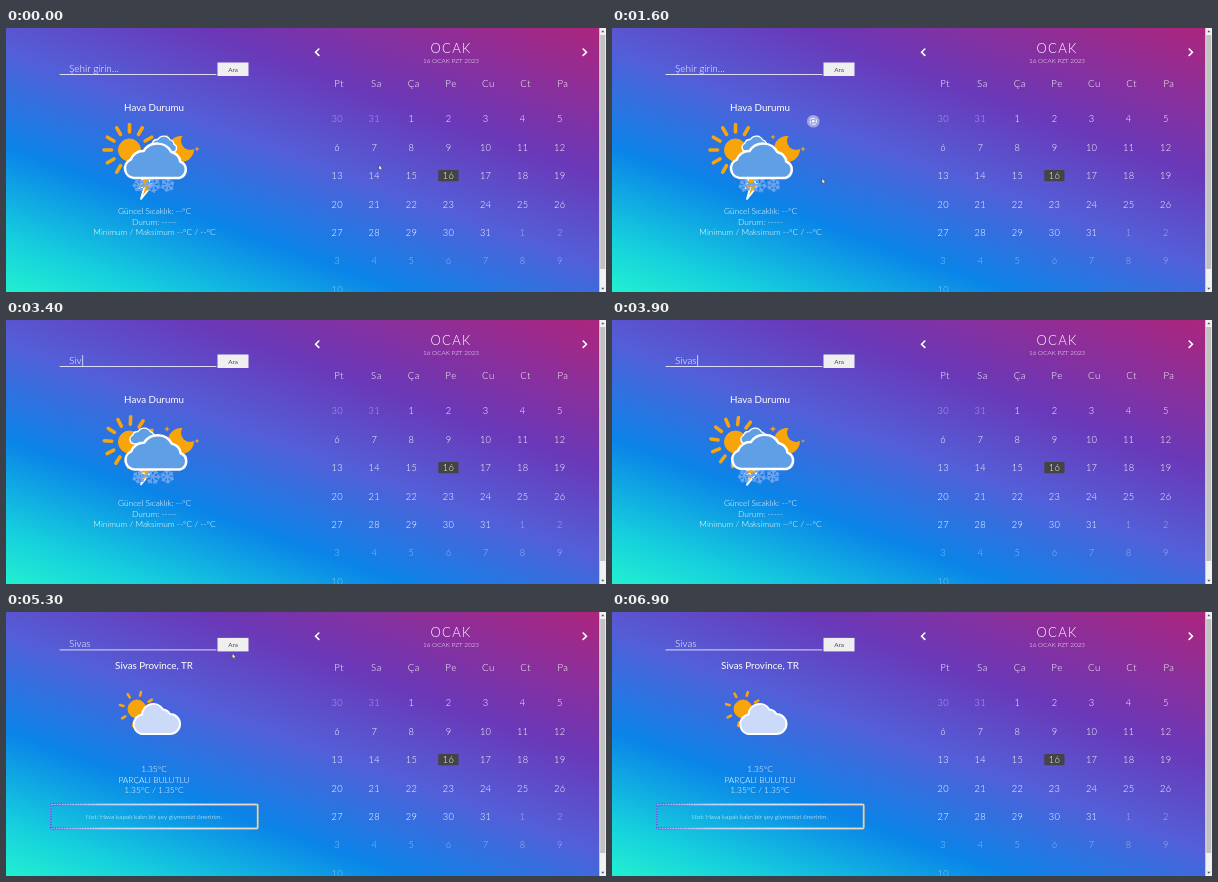
Recreate the animation shown at these times as an HTML page. Size 600 px wide and 264 px high, loop 7000 ms.

```html
<!DOCTYPE html>
<html lang="tr">
<head>
<meta charset="utf-8">
<title>Hava Durumu</title>
<style>
html, body { margin: 0; width: 100%; height: 100%; overflow: hidden; }
body { background: linear-gradient(20deg, #22f0d0, #16d0dd 11%, #0a84e8 30%, #535fd8 50%, #6a38b8 69%, #ad257c); }
svg { display: block; width: 600px; height: 264px; font-family: Lato, "Open Sans", sans-serif; font-weight: 300; fill: #fff; }
.mid text, text.mid { text-anchor: middle; }
.head { font-size: 9.8px; font-weight: 400; }
.info { font-size: 8.4px; }
.days { font-size: 9.3px; letter-spacing: .3px; }
.week { font-size: 9.6px; letter-spacing: .6px; }
.dim { opacity: .5; }
.line { fill: none; stroke: #fff; stroke-linecap: round; }
.orange { fill: #f8a50b; stroke: #f8a50b; stroke-linecap: round; }
</style>
</head>
<body>
<svg viewBox="0 0 600 264">
  <defs>
    <linearGradient id="edge" x2="1" y2="0">
      <stop stop-color="#4b5be6"/><stop offset=".25" stop-color="#a3b4f2"/>
      <stop offset=".65" stop-color="#cfcfe6"/><stop offset="1" stop-color="#e6c08c"/>
    </linearGradient>
    <mask id="crescent">
      <circle cx="175" cy="121" r="13" fill="#fff"/>
      <circle cx="184" cy="113" r="9" fill="#000"/>
    </mask>
    <path id="cloud" d="M10 36A10 10 0 0 1 7 17A13 13 0 0 1 20 8A16 16 0 0 1 48 9A12 12 0 0 1 57 19A9 9 0 0 1 56 36Z"/>
    <path id="star" d="M0-3L.8-.8L3 0L.8 .8L0 3L-.8 .8L-3 0L-.8-.8Z" fill="#f8a50b"/>
  </defs>

  <g id="calendar" class="mid">
    <text x="445" y="25" font-size="13" letter-spacing="1.3">OCAK</text>
    <text x="445" y="34.5" font-size="6.4">16 OCAK PZT 2023</text>
    <path class="line" stroke-width="1.6" d="M312.8 21l-3.2 3.2 3.2 3.2M577.2 21l3.2 3.2-3.2 3.2"/>
    <rect x="432.3" y="142" width="20.2" height="11.3" rx="1" fill="#444"/>
  </g>

  <g id="search">
    <text id="field" x="63" y="43.6" font-size="10"></text>
    <path id="caret" class="line" stroke-width=".7"/>
    <path class="line" stroke-width=".8" d="M54 46.5H210"/>
    <rect x="211.5" y="34.5" width="31" height="13.5" fill="#efefef"/>
    <text class="mid" x="227" y="43.5" font-size="6.3" font-weight="400" fill="#444">Ara</text>
  </g>

  <g id="before">
    <text class="mid head" x="148" y="83.2">Hava Durumu</text>
    <g class="orange">
      <g id="bigRays" stroke-width="3.6"></g>
      <circle cx="123.5" cy="122" r="11"/>
    </g>
    <rect x="160" y="105" width="32" height="32" fill="#f8a50b" mask="url(#crescent)"/>
    <use href="#star" id="starA"/>
    <use href="#star" id="starB"/>
    <path id="bolt" fill="#f8a50b" stroke="#fff" stroke-width="1.8" stroke-linejoin="round"/>
    <g id="snow" fill="none" stroke="#6aa4ee" stroke-width="1.7"></g>
    <g fill="#5f9fe6" stroke="#fff" stroke-linejoin="round">
      <use href="#cloud" id="backCloud" stroke-width="3"/>
      <use href="#cloud" id="frontCloud" stroke-width="2.6"/>
    </g>
    <g class="mid info">
      <text x="148.5" y="186.3">Güncel Sıcaklık: --°C</text>
      <text x="148.5" y="196.7">Durum: -----</text>
      <text x="148.5" y="207">Minimum / Maksimum --°C / --°C</text>
    </g>
    <g id="lens">
      <circle cx="201.3" cy="93.3" r="6.3" fill="#b9bfe6" opacity=".75"/>
      <rect x="198.3" y="90.3" width="6" height="6" rx="1.6" class="line" stroke-width=".9" stroke-dasharray="3 1.6"/>
      <circle cx="201.3" cy="93.3" r="1.2"/>
    </g>
  </g>

  <g id="after">
    <text class="mid head" x="148" y="57">Sivas Province, TR</text>
    <g class="orange">
      <g id="smallRays" stroke-width="2.6"></g>
      <circle cx="131" cy="97" r="9"/>
    </g>
    <path id="paleCloud" d="M9 33A10 10 0 0 1 10 13.5A11.3 11.3 0 0 1 31 8.5A10 10 0 0 1 38 13A10 10 0 0 1 38 33Z" fill="#cbdaf8" stroke="#fff" stroke-width="2"/>
    <g class="mid info">
      <text x="148" y="160">1.35°C</text>
      <text x="148" y="170.5">PARÇALI BULUTLU</text>
      <text x="148" y="180.7">1.35°C / 1.35°C</text>
    </g>
    <rect x="45" y="192.5" width="206.7" height="24" rx="1" fill="none" stroke="url(#edge)" stroke-width="1.8"/>
    <rect x="45" y="192.5" width="206.7" height="24" rx="1" class="line" stroke-width=".8" stroke-dasharray=".8 1.8" opacity=".7"/>
    <text class="mid" x="148" y="207" font-size="6.6">Not: Hava kapalı kalın bir şey giymenizi öneririm.</text>
  </g>

  <path id="cursor" d="M0 0V5L1.2 4L2 5.8L2.8 5.4L2 3.7H3.6Z" stroke="#222" stroke-width=".4"/>

  <g id="scrollbar">
    <rect x="593.3" width="7" height="264" fill="#f1f1f1"/>
    <rect x="594.2" y="7" width="5" height="234" fill="#c1c1c1"/>
    <path d="M595.2 4.3h3.2l-1.6-2ZM595.2 259.8h3.2l-1.6 2Z" fill="#555"/>
  </g>
</svg>
<script>
const LOOP = 7000, STEP = 100, SWAP = 5200;
const $ = id => document.getElementById(id);
const add = (id, markup) => $(id).insertAdjacentHTML('beforeend', markup);
const show = (id, on) => $(id).setAttribute('visibility', on ? 'visible' : 'hidden');
const place = (id, x, y, extra = '') => $(id).setAttribute('transform', `translate(${x} ${y}) ${extra}`);

// Linear interpolation through rows of [time, ...values]
function along(rows, t) {
  const i = rows.findIndex(r => r[0] > t);
  if (i < 0) return rows[rows.length - 1].slice(1);
  if (i === 0) return rows[0].slice(1);
  const a = rows[i - 1], b = rows[i], k = (t - a[0]) / (b[0] - a[0]);
  return a.slice(1).map((v, n) => v + (b[n + 1] - v) * k);
}

const week = ['Pt', 'Sa', 'Ça', 'Pe', 'Cu', 'Ct', 'Pa'];
add('calendar', week.map((d, i) =>
  `<text class="week" x="${333.2 + i * 37.3}" y="58.5">${d}</text>`).join(''));
for (let i = 0; i < 43; i++) {
  const n = i - 1, day = n < 1 ? n + 31 : n > 31 ? n - 31 : n;
  const x = 331.2 + (i % 7) * 37.1, y = 94.4 + Math.floor(i / 7) * 28.4;
  add('calendar', `<text class="days${n === day ? '' : ' dim'}" x="${x}" y="${y}">${day}</text>`);
}

const rays = (count, from, to) => Array.from({ length: count }, (_, i) =>
  `<path d="M${from} 0H${to}" transform="rotate(${i * 360 / count})"/>`).join('');
add('bigRays', rays(12, 18, 25.5));
add('smallRays', rays(8, 13.8, 17.5));

const flakes = [[133, 157.5, 6.5], [147, 157, 8], [161.5, 157, 7]];
add('snow', flakes.map(([, , r]) => {
  const arm = `M0 0H${r}M${r * .5} 0l${r * .3} ${r * .3}M${r * .5} 0l${r * .3} ${-r * .3}`;
  return '<g>' + [0, 60, 120, 180, 240, 300].map(a => `<path d="${arm}" transform="rotate(${a})"/>`).join('') + '</g>';
}).join(''));

const boltReach = [[0, 171], [800, 165], [1600, 171], [2400, 170], [3400, 164.5], [4500, 165.5], [5200, 171]];
const typed = [[0, ''], [3000, 'S'], [3200, 'Si'], [3300, 'Siv'], [3600, 'Siva'], [3800, 'Sivas']];
const pointer = [
  { from: 0, to: 2100, path: [[300, 373, 137], [700, 210, 150.5], [1800, 210, 150.5], [2100, 120, 44]] },
  { from: 4600, to: 6400, path: [[4600, 215, 50], [4900, 226, 41.5], [5500, 226.5, 41.5], [6200, 225, 57]] }
];

function drawBefore(t) {
  const wave = Math.sin(t / 3200 * 2 * Math.PI);
  const drift = Math.cos(t / 5600 * 2 * Math.PI);
  place('bigRays', 123.5, 122, `rotate(${wave * 7}) scale(${1 - wave * .03})`);
  place('frontCloud', 117.8 + wave * 1.3, 115.4 - Math.max(0, wave), 'scale(.99 .96)');
  place('backCloud', 132 + drift * 11, 108, 'scale(.44)');
  place('starA', 161, 109, `scale(${.9 + wave * .2})`);
  place('starB', 191, 121, `scale(${.9 - wave * .2})`);
  const [end] = along(boltReach, t);
  $('bolt').setAttribute('d', `M138 146L133 ${end - 11}H138L135 ${end}L147 ${end - 15}H142L147 146Z`);
  [...$('snow').children].forEach((f, i) => {
    const [x, y] = flakes[i];
    f.setAttribute('transform', `translate(${x - wave * .6} ${y - wave}) rotate(${t * .03 + i * 20})`);
  });
  show('lens', t >= 600 && t < 1900);
}

function drawAfter(t) {
  const s = t - SWAP;
  place('smallRays', 131, 97, `rotate(${s * .03 + 10})`);
  place('paleCloud', 126 + .5 * Math.sin(s / 1100), 89);
}

function drawSearch(t) {
  const word = typed.filter(r => r[0] <= t).pop()[1], field = $('field');
  field.textContent = word || 'Şehir girin...';
  const x = 63.3 + (word ? field.getComputedTextLength() + .8 : 0);
  $('caret').setAttribute('d', `M${x} 35.5V45.5`);
  const blink = t < 2800 || t >= 3000;
  show('caret', t >= 2200 && t < 4300 && blink);
  place('search', 0, t < SWAP ? 0 : -8.6);
}

function draw(t) {
  const found = t >= SWAP;
  $('before').style.display = found ? 'none' : '';
  $('after').style.display = found ? '' : 'none';
  if (found) drawAfter(t); else drawBefore(t);
  drawSearch(t);
  const leg = pointer.find(p => t >= p.from && t < p.to);
  show('cursor', !!leg);
  if (leg) place('cursor', ...along(leg.path, t));
}

const start = performance.now();
function tick() {
  const t = Math.max(0, performance.now() - start) % LOOP;
  draw(Math.floor(t / STEP) * STEP);
  requestAnimationFrame(tick);
}
tick();
</script>
</body>
</html>
```
